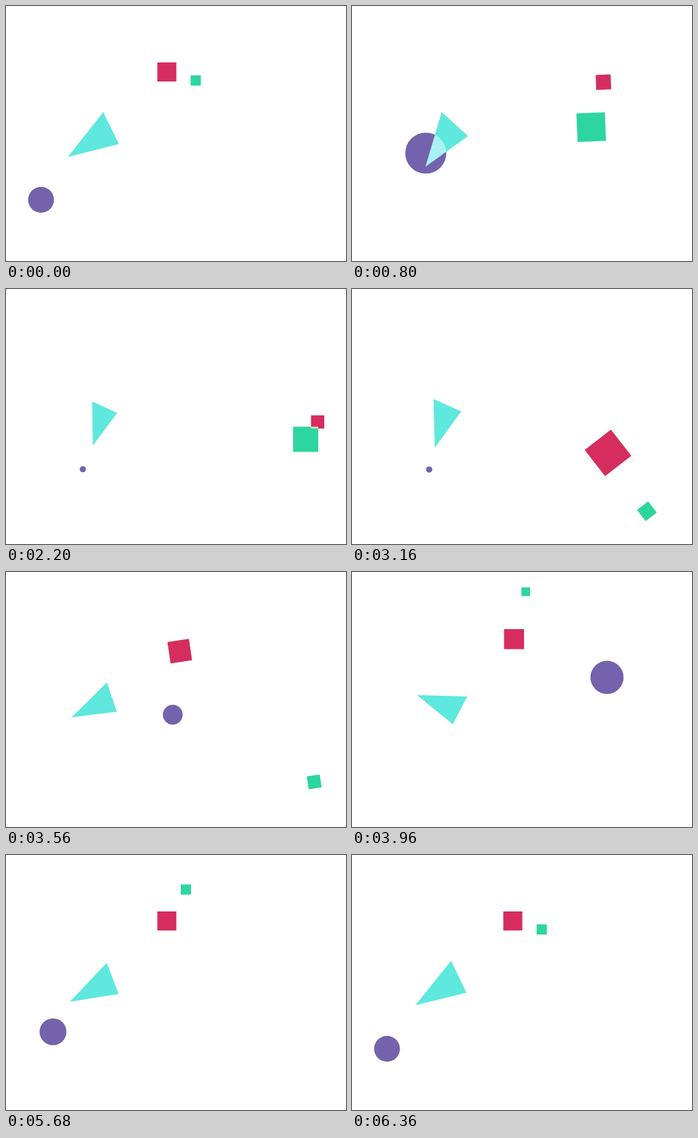
These frames come from a looping animation (500x375 px, 6.4 s). An HTML page with a canvas:

```html
<!DOCTYPE html>
<html lang="en">
<head>
<meta charset="utf-8">
<title>Shapes</title>
<style>
html, body { margin: 0; height: 100%; overflow: hidden; background: #fff; }
canvas { display: block; width: 500px; height: 375px; }
</style>
</head>
<body>
<canvas id="stage" width="500" height="375"></canvas>
<script>
const LOOP = 6400, SWING = 1280;
const ctx = document.getElementById('stage').getContext('2d');

// Easing: turns the elapsed share of a move into its progress
const linear = u => u;
const speedUp = u => u * u;
const slowDown = u => 1 - (1 - u) ** 3;
const smooth = u => u < 0.5 ? 4 * u ** 3 : 1 - 4 * (1 - u) ** 3;
const back = u => {
  const half = v => 2 * v * v * (7.19 * v - 2.595);
  return u < 0.5 ? half(u) : 1 - half(1 - u);
};

const clamp = u => Math.min(1, Math.max(0, u));

// A path is a start pose, then moves: [end time, easing, pose]
function poseAt({ start, moves }, t) {
  let from = start, begin = 0;
  for (const [end, ease, to] of moves) {
    if (t < end) {
      const p = ease((t - begin) / (end - begin));
      return from.map((v, i) => v + (to[i] - v) * p);
    }
    from = to;
    begin = end;
  }
  return from;
}

// Poses are x, y, size
const red = {
  start: [236.5, 97, 28],
  moves: [
    [SWING, back, [373.4, 112.4, 21.8]],
    [2200, smooth, [458.3, 195.5, 19.5]],
    [2720, smooth, [470, 126, 30]],
    [3160, speedUp, [377, 241.5, 49]],
    [3960, slowDown, [238.3, 98.7, 29.5]],
    [4400, smooth, [236.5, 97, 28]]
  ]
};

const green = {
  start: [279, 109.5, 15],
  moves: [
    [SWING, back, [353.8, 180, 42.6]],
    [2200, smooth, [440.7, 221, 37]],
    [3160, speedUp, [433.2, 326.7, 20.7]],
    [3400, slowDown, [474, 338, 20]],
    [3960, smooth, [255.5, 29, 12.8]],
    [4760, smooth, [259.5, 32, 14.5]],
    [5400, smooth, [260, 32.5, 15]],
    [6120, smooth, [279, 109.5, 15]]
  ]
};

const purple = {
  start: [51.5, 285, 19],
  moves: [
    [800, smooth, [108.5, 216.4, 30.2]],
    [1400, smooth, [112, 232, 5]],
    [2200, smooth, [113, 265, 4.6]],
    [3160, smooth, [113.5, 265.5, 4.6]],
    [3960, smooth, [375, 155, 24.4]],
    [4760, speedUp, [253.7, 113.2, 24.4]],
    [5440, linear, [117, 192, 22]],
    [6120, slowDown, [51.5, 285, 19]]
  ]
};

// Poses are x, y, scale, degrees
const cyan = {
  start: [133.3, 193.7, 1, 0],
  moves: [
    [800, smooth, [136.8, 194.6, 1, -21.7]],
    [2200, smooth, [139.3, 192.7, 0.775, -39]],
    [3160, smooth, [134.1, 191.7, 0.855, -39.8]],
    [3960, smooth, [137.7, 196, 0.88, 53.3]],
    [4760, smooth, [138, 192.7, 0.275, 57]],
    [LOOP, slowDown, [135.7, 193, 1, 0.5]]
  ]
};

function shape(color, x, y, degrees, trace) {
  ctx.save();
  ctx.translate(x, y);
  ctx.rotate(degrees * Math.PI / 180);
  ctx.fillStyle = color;
  ctx.beginPath();
  trace();
  ctx.fill();
  ctx.restore();
}

// Both squares make a quarter turn and later swing back
function square(color, path, t) {
  const [x, y, size] = poseAt(path, t);
  const turn = 90 * (back(clamp(t / SWING)) - back(clamp((t - 2540) / SWING)));
  shape(color, x, y, turn, () => ctx.rect(-size / 2, -size / 2, size, size));
}

function circle(color, path, t) {
  const [x, y, r] = poseAt(path, t);
  shape(color, x, y, 0, () => ctx.arc(0, 0, r, 0, 2 * Math.PI));
}

function triangle(color, path, t) {
  const [x, y, s, degrees] = poseAt(path, t);
  shape(color, x, y, degrees, () => {
    ctx.moveTo(9.7 * s, -37.7 * s);
    ctx.lineTo(32.7 * s, 9.3 * s);
    ctx.lineTo(-42.3 * s, 28.3 * s);
  });
}

function draw() {
  const t = performance.now() % LOOP;
  ctx.clearRect(0, 0, 500, 375);
  // Overlaps lighten each other, not the page behind
  ctx.globalCompositeOperation = 'screen';
  circle('#7462ac', purple, t);
  triangle('#5fe8dd', cyan, t);
  square('#d62d5f', red, t);
  square('#2cd69e', green, t);
  requestAnimationFrame(draw);
}
draw();
</script>
</body>
</html>
```
